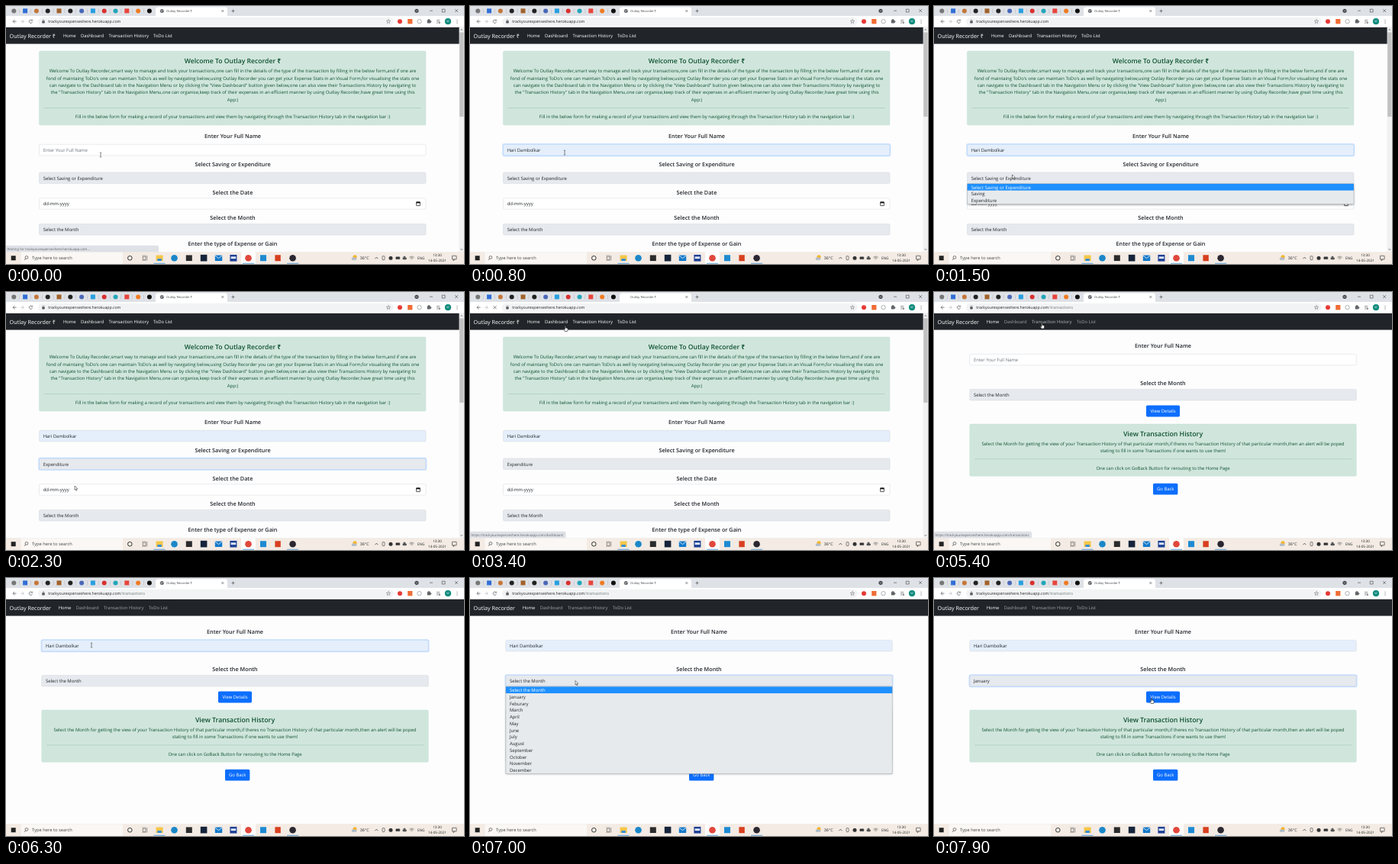
Write an HTML page with a canvas that moves like this. It is 600 px wide and 338 px high and loops after 8000 ms.

```html
<!DOCTYPE html>
<html lang="en">
<head>
<meta charset="utf-8">
<title>Outlay Recorder</title>
<style>
html, body { margin: 0; width: 100%; height: 100%; overflow: hidden; background: #fff; }
canvas { display: block; width: 600px; height: 338px; }
</style>
</head>
<body>
<canvas id="stage"></canvas>
<script>
const W = 600, H = 338, LOOP = 8000;
const canvas = document.getElementById('stage');
const ctx = canvas.getContext('2d');
const dpr = window.devicePixelRatio || 1;
canvas.width = W * dpr;
canvas.height = H * dpr;

const APP = 'Outlay Recorder', PERSON = 'Hari Dambolkar';
const HOST = 'trackyourexpenseshere.herokuapp.com';
const INK = '#212529', GREEN = '#0f5132', BLUE = '#0d6efd', DIM = '#a0a3a6', PAPER = '#fdfdfe';
const MONTHS = ['Select the Month', 'January', 'Feburary', 'March', 'April', 'May', 'June', 'July',
  'August', 'September', 'October', 'November', 'December'];
const KINDS = ['Select Saving or Expenditure', 'Saving', 'Expenditure'];

// Moments of the story, in ms
const T = {
  ready: 400, focusName: 300, fillName: 800, openKind: 1500, pickKind: 2300, blurKind: 2600,
  hoverDash: 3100, clickDash: 3300, dash: 3800, hoverTrans: 4400, clickTrans: 4900, trans: 5100,
  leaveNav: 5600, focusName2: 6000, fillName2: 6300, openMonth: 6800, pickMonth: 7500
};

// time, x, y of the pointer's hot spot
const PATH = [
  [0, 124, 195], [900, 124, 192], [1400, 102.5, 221], [1800, 102.5, 221], [2150, 90, 254],
  [2400, 90, 254], [3200, 125, 44.5], [3900, 125, 44.5], [4400, 141.5, 41], [5500, 141.5, 41],
  [5950, 112, 88], [6300, 112, 88], [6700, 138, 134.5], [7150, 138, 134.5], [7400, 84, 155],
  [7550, 84, 155], [7800, 285, 157.5], [8000, 285, 157.5]
];

function pointerAt(t) {
  let i = 0;
  while (i < PATH.length - 2 && t >= PATH[i + 1][0]) i++;
  const [t0, x0, y0] = PATH[i], [t1, x1, y1] = PATH[i + 1];
  const p = Math.min(1, (t - t0) / (t1 - t0)), e = p * p * (3 - 2 * p);
  return { x: x0 + (x1 - x0) * e, y: y0 + (y1 - y0) * e };
}

function rect(x, y, w, h, fill) {
  ctx.fillStyle = fill;
  ctx.fillRect(x, y, w, h);
}

function box(x, y, w, h, r, fill, stroke, lw = 0.4) {
  ctx.beginPath();
  ctx.roundRect(x, y, w, h, r);
  if (fill) { ctx.fillStyle = fill; ctx.fill(); }
  if (stroke) { ctx.strokeStyle = stroke; ctx.lineWidth = lw; ctx.stroke(); }
}

function disc(x, y, r, fill, stroke, lw = 0.7) {
  ctx.beginPath();
  ctx.arc(x, y, r, 0, Math.PI * 2);
  if (fill) { ctx.fillStyle = fill; ctx.fill(); }
  if (stroke) { ctx.strokeStyle = stroke; ctx.lineWidth = lw; ctx.stroke(); }
}

function line(points, color, lw = 0.6, close = false, fill) {
  ctx.beginPath();
  for (let i = 0; i < points.length; i += 2) ctx.lineTo(points[i], points[i + 1]);
  if (close) ctx.closePath();
  if (fill) { ctx.fillStyle = fill; ctx.fill(); }
  ctx.strokeStyle = color;
  ctx.lineWidth = lw;
  ctx.stroke();
}

// y is the middle of the capitals; set large and scaled down for exact spacing.
// The invisible skew keeps small glyphs from snapping to whole pixels.
function text(str, x, y, { size = 5.91, color = INK, weight = 400, align = 'left' } = {}) {
  const k = size / 100;
  ctx.save();
  ctx.transform(k, k * 2e-4, k * 2e-4, k, x, y + size * 0.36);
  ctx.font = weight + ' 100px "Open Sans", "Noto Sans", sans-serif';
  ctx.textRendering = 'geometricPrecision';
  ctx.textAlign = align;
  ctx.fillStyle = color;
  ctx.fillText(str, 0, 0);
  ctx.restore();
}

const heading = (str, x, y, size = 7.25, color = INK) =>
  text(str, x, y, { size, color, weight: 600, align: 'center' });

function paragraph(lines, x, y, step = 9.37) {
  lines.forEach((s, i) => text(s, x, y + i * step, { color: GREEN, align: 'center' }));
}

function field(x, y, str, { fill = '#fff', ring = false, color = INK } = {}) {
  if (ring) box(x - 0.6, y - 0.6, 507.7, 15.8, 2.2, null, 'rgba(13,110,253,.2)', 1.3);
  box(x, y, 506.5, 14.6, 1.6, fill, ring ? '#9cc4f6' : '#ced4da', 0.45);
  text(str, x + 5.2, y + 7.5, { color });
}

const input = (x, y, hint) => field(x, y, hint, { color: '#6c757d' });
const select = (x, y, str, ring) => field(x, y, str, { fill: '#e6e9ed', ring });

function nameField(x, y, hint, filled, ring) {
  if (filled) field(x, y, PERSON, { fill: '#e5effb', ring });
  else field(x, y, hint, { color: '#6c757d', ring });
}

function button(cx, y, w, str) {
  box(cx - w / 2, y, w, 14.8, 1.6, BLUE);
  text(str, cx, y + 7.5, { color: '#fff', align: 'center' });
}

function panel(x, y, h, rule) {
  box(x, y, 506.5, h, 1.6, '#d0e6dc', '#badbcc');
  rect(x + 6.5, rule, 493.5, 0.45, '#93b8a5');
}

function dropdown(x, y, items, step, mouse) {
  const h = items.length * step + 0.7;
  ctx.save();
  ctx.shadowColor = 'rgba(0,0,0,.4)';
  ctx.shadowBlur = 3 * dpr;
  ctx.shadowOffsetY = dpr;
  rect(x, y, 506.5, h, '#e7eaed');
  ctx.restore();
  const over = Math.floor((mouse.y - y - 0.3) / step);
  const active = over >= 0 && over < items.length ? over : 0;
  rect(x, y + 0.3 + active * step, 506.5, step, '#1e90ff');
  items.forEach((s, i) => text(s, x + 5.2, y + 0.5 + (i + 0.5) * step,
    { color: i === active ? '#fff' : INK }));
  box(x, y, 506.5, h, 0, null, '#8f979e', 0.4);
}

function scrollbar(end) {
  rect(593.6, 27.7, 6.4, 294.5, '#f1f1f1');
  rect(594.2, 34.5, 5.3, end - 34.5, '#c1c1c1');
  line([595.4, 32, 596.8, 30.4, 598.2, 32], '#606060', 0.7);
  line([595.4, 318, 596.8, 319.6, 598.2, 318], '#606060', 0.7);
}

function nav(brand, links, color) {
  rect(0, 27.7, 600, 21.9, INK);
  text(brand, 4.6, 39.4, { size: 7.2, color: '#fff' });
  links.forEach(([s, x], i) => text(s, x, 39.2, { size: 5.82, color: color(i) }));
}

const HOME_LINKS = [['Home', 75], ['Dashboard', 98], ['Transaction History', 134.5], ['ToDo List', 193]];
const SUB_LINKS = [['Home', 68.8], ['Dashboard', 91.7], ['Transaction History', 128], ['ToDo List', 187]];

function homePage(t, mouse) {
  const x = 43.5, cx = 297;
  nav(APP + ' ₹', HOME_LINKS, () => '#fff');
  panel(x, 59, 97.1, 133.3);
  heading(`Welcome To ${APP} ₹`, cx, 72, 8.6, GREEN);
  paragraph([
    `Welcome To ${APP},smart way to manage and track your transactions,one can fill in the details of the type of the transaction by filling in the below form,and if one are`,
    `fond of maintaing ToDo's one can maintain ToDo's as well by navigating below,using ${APP} you can get your Expense Stats in an Visual Form,for visualising the stats one`,
    'can navigate to the Dashboard tab in the Navigation Menu or by clicking the "View Dashboard" button given below,one can also view their Transactions History by navigating to',
    `the "Transaction History" tab in the Navigation Menu,one can organise,keep track of their expenses in an efficient manner by using ${APP},have great time using this`,
    'App:)'
  ], cx, 85.2);
  paragraph(['Fill in the below form for making a record of your transactions and view them by navigating through the Transaction History tab in the navigation bar :)'], cx, 145.3);

  heading('Enter Your Full Name', cx, 170.7);
  nameField(x, 181.3, 'Enter Your Full Name', t >= T.fillName, t >= T.focusName && t < T.openKind + 100);
  heading('Select Saving or Expenditure', cx, 207.5);
  select(x, 218, KINDS[t >= T.pickKind ? 2 : 0], t >= T.openKind + 100 && t < T.blurKind);
  heading('Select the Date', cx, 244.2);
  field(x, 251.6, 'dd-mm-yyyy');
  box(537.6, 256.8, 4.8, 4.8, 0.4, null, '#111', 0.7);
  rect(537.5, 256.6, 5, 1.7, '#111');
  heading('Select the Month', cx, 277.8);
  select(x, 285.4, MONTHS[0]);
  heading('Enter the type of Expense or Gain', cx, 311.5);
  if (t >= T.openKind && t < T.pickKind) dropdown(x, 232.6, KINDS, 8.75, mouse);
  scrollbar(145);
}

function dashboardPage(t) {
  const x = 43.5, cx = 297;
  nav(APP, SUB_LINKS, i => i === 0 ? '#fff' : i === 2 && t >= T.hoverTrans ? '#c8c9ca' : DIM);
  heading('Expense Dashboard', cx, 66.4, 10);
  panel(x, 81.7, 109.8, 125.8);
  paragraph([
    'Money considered is based on Montly Income,all the computations are done based on Montly Income only,if there are any other sources of income,kindly try include them under',
    `Savings and if you have used that money on some Expenditures,kindly include them into Expenditures,for getting the better experience of the ${APP},user can view all`,
    'their transactions by clicking on the "View Transactions" button given at the end.'
  ], cx, 96.5);
  paragraph([
    'Enter The Annual Income and the Month so that one can track their expenditures and savings monthwise as well as on Day by Day Basis,also',
    'One can view their transactions,by clicking the "View Transaction" button'
  ], cx, 138);
  button(299.8, 160.9, 59.4, 'View Transactions');
  heading('Enter Full Name', cx, 206.4);
  input(x, 216.9, 'Enter Your Full Name');
  heading('Enter Annual Income', cx, 243.2);
  input(x, 253.6, 'Enter the Annual Income');
  heading('Select The Month', cx, 279.8);
  select(x, 290.4, 'Select The Month');
  button(299.8, 314.8, 55.5, 'View Dashboard');
  scrollbar(287);
}

function transactionsPage(t, mouse) {
  const x = 46.8, cx = 300;
  nav(APP, SUB_LINKS, i => i === 0 ? '#fff' : i === 2 && t < T.leaveNav ? '#b8babc' : DIM);
  heading('Enter Your Full Name', cx, 70.5);
  nameField(x, 81.4, 'Enter Your Full Name', t >= T.fillName2, t >= T.focusName2 && t < T.openMonth);
  heading('Select the Month', cx, 119.8);
  select(x, 127.4, MONTHS[t >= T.pickMonth ? 1 : 0], t >= T.openMonth);
  button(300, 148.6, 44, 'View Details');
  panel(x, 173, 68.2, 218.7);
  heading('View Transaction History', cx, 185.7, 8.75, GREEN);
  paragraph([
    'Select the Month for getting the view of your Transaction History of that particular month,if theres no Transaction History of that particular month,then an alert will be poped',
    'stating to fill in some Transactions if one wants to use them!'
  ], cx, 198.9);
  paragraph(['One can click on GoBack Button for rerouting to the Home Page'], cx, 230.4);
  button(303.2, 250.8, 32.4, 'Go Back');
  if (t >= T.openMonth && t < T.pickMonth) dropdown(x, 142, MONTHS, 8.75, mouse);
}

const TABS = ['#777', '#2f6fd6', '#c4763a', '#222', '#a0622a', '#222', '#4a68b8', '#28a0e0', '#d93030',
  '#22a6b8', '#e8453c', '#ef7b22', '#111'];

function browserTop(path, loading) {
  rect(0, 0, 600, 13, '#dee1e6');
  TABS.forEach((c, i) => {
    const x = 10.3 + i * 14.8;
    if (i % 3 === 1) rect(x - 3, 3.4, 6, 6, c);
    else disc(x, 6.4, 3, c);
    if (i) rect(x - 7.6, 3.5, 0.4, 6, '#a9adb3');
  });
  box(196, 1.4, 94, 13, [3, 3, 0, 0], '#fff');
  if (!loading) {
    disc(204.3, 6.5, 2.5, '#5f6368');
    line([202.6, 5.6, 204, 6.6, 203.6, 8], '#fff', 0.6);
    line([205, 4.8, 205.8, 6.4], '#fff', 0.6);
  }
  text(APP + ' ₹', 210, 6.5, { size: 4.05, color: '#3c4043' });
  line([282.4, 5.1, 285.2, 7.9], '#444');
  line([285.2, 5.1, 282.4, 7.9], '#444');
  line([295.4, 6.5, 299.6, 6.5], '#444');
  line([297.5, 4.4, 297.5, 8.6], '#444');
  disc(538, 6.3, 2.6, '#4a4d51');
  line([537, 5.8, 538, 6.9, 539, 5.8], '#fff', 0.5);
  line([555, 6.2, 559, 6.2], '#222', 0.5);
  box(571.3, 4.2, 3.8, 3.8, 0, null, '#222', 0.5);
  line([588.2, 4.2, 592, 8], '#222', 0.5);
  line([592, 4.2, 588.2, 8], '#222', 0.5);

  rect(0, 13, 600, 14.7, '#fff');
  box(42, 14.8, 465.5, 11, 5.5, '#f1f3f4');
  line([11.4, 17.9, 9.1, 20.2, 11.4, 22.5], '#50545a', 0.7);
  line([9.2, 20.2, 13.6, 20.2], '#50545a', 0.7);
  line([21.2, 17.9, 23.5, 20.2, 21.2, 22.5], '#b5b8bc', 0.7);
  line([19, 20.2, 23.4, 20.2], '#b5b8bc', 0.7);
  if (loading) {
    line([30.6, 18.2, 34.6, 22.2], '#50545a', 0.7);
    line([34.6, 18.2, 30.6, 22.2], '#50545a', 0.7);
  } else {
    ctx.beginPath();
    ctx.arc(32.5, 20.2, 2.2, 0.4, 5.4);
    ctx.strokeStyle = '#50545a';
    ctx.lineWidth = 0.7;
    ctx.stroke();
    line([34.7, 17.6, 34.7, 19.4, 32.9, 19.4], '#50545a', 0.6);
  }
  box(47.3, 19.6, 3.4, 2.9, 0.4, '#50545a');
  box(48, 17.9, 2, 3, 1, null, '#50545a', 0.5);
  text(HOST, 55.2, 20.2, { size: 5.13, color: '#202124' });
  text(path, 150.6, 20.2, { size: 5.13, color: '#70757a' });

  const star = [];
  for (let i = 0; i < 10; i++) {
    const r = i % 2 ? 1.2 : 2.8, a = i * Math.PI / 5 - Math.PI / 2;
    star.push(501 + r * Math.cos(a), 20.3 + r * Math.sin(a));
  }
  line(star, '#5f6368', 0.5, true);
  disc(516, 20.2, 3, '#e53935');
  rect(526.2, 17, 6.2, 6.4, '#ef6c35');
  disc(541.5, 20.2, 2.7, null, '#8a8d91');
  box(551.8, 18.2, 4.4, 4.4, 0.6, '#5f6368');
  disc(554, 17.9, 1, '#5f6368');
  disc(556.5, 20.4, 1, '#5f6368');
  for (let i = 0; i < 3; i++) {
    rect(564, 18 + i * 1.9, i === 2 ? 2.6 : 4.4, 0.6, '#5f6368');
    disc(591, 18.2 + i * 2, 0.55, '#5f6368');
  }
  disc(568, 22, 0.9, '#5f6368');
  disc(579, 20.2, 4.1, '#128c7e');
  text('st', 579, 20, { size: 4, color: '#fff', align: 'center' });
}

function statusBar(str, w) {
  box(-1, 314.2, w + 1, 9, [0, 1.5, 0, 0], '#dee1e6', '#c4c7cc', 0.4);
  text(str, 1.6, 318.3, { size: 4.39, color: '#5f6368' });
}

function taskbar() {
  rect(0, 322.2, 600, 15.8, '#f3ebe4');
  rect(19.5, 322.5, 133.5, 15.5, '#faf7f4');
  rect(6.7, 327.2, 6, 6, '#222');
  disc(27, 329.4, 1.9, null, '#333', 0.6);
  line([25.7, 330.8, 24, 332.8], '#333', 0.7);
  text('Type here to search', 34, 330.2, { size: 5.76, color: '#444' });
  disc(162.3, 330.2, 2.8, null, '#222', 0.9);
  box(179.3, 328, 3.6, 4.4, 0, null, '#444', 0.6);
  line([178, 327, 184, 327], '#777', 0.4);
  line([178, 333.4, 184, 333.4], '#777', 0.4);
  line([184.7, 327, 184.7, 333.4], '#444', 0.5);

  rect(308, 322.2, 19, 15.8, '#fffdfb');
  box(196.6, 326.6, 9, 7.4, 0.6, '#f5c64a');
  rect(198.4, 331, 5.4, 3, '#3b8fd4');
  disc(220.5, 330.2, 4.3, '#1b87c9');
  rect(235.8, 326.4, 8, 7.6, '#2b2b2b');
  rect(254.8, 325.8, 8.6, 8.6, '#15243a');
  box(273.8, 326.4, 9.4, 7.6, 0.4, '#1479c9');
  line([274, 327, 278.5, 330.6, 283, 327], '#fff', 0.8);
  rect(293.4, 325.9, 9, 8.6, '#1c3f94');
  rect(294.6, 328.3, 6.6, 2.8, '#dfe8f7');
  disc(317.5, 330.2, 4.3, '#e0483c');
  rect(333, 326.2, 8, 8, '#1f8ad2');
  rect(352.4, 326.2, 7.4, 8, '#d8401f');
  disc(375.6, 330.2, 4.3, '#2a2730');
  for (const x of [201, 317.5, 375.6]) rect(x - 7.5, 336.8, 15, 0.8, '#3f8fd0');

  disc(457, 328.8, 2.6, '#f5b52e');
  box(452.8, 329.6, 6.4, 3.2, 1.6, '#aebccb');
  text('36°C', 463.8, 330.2, { size: 5.3, color: '#222' });
  line([483.4, 331.2, 485.4, 329.2, 487.4, 331.2], '#222', 0.7);
  box(493, 327.6, 3, 5, 0.8, null, '#333', 0.6);
  disc(504, 330.2, 2.5, '#333');
  box(510.8, 328.8, 5, 2.8, 0.3, '#333', '#333', 0.5);
  box(519.4, 329.4, 5.6, 2.8, 1.4, '#555');
  disc(522, 329, 1.5, '#555');
  for (let i = 1; i < 4; i++) {
    ctx.beginPath();
    ctx.arc(531.5, 332.6, i * 1.5, -2.3, -0.85);
    ctx.strokeStyle = '#555';
    ctx.lineWidth = 0.6;
    ctx.stroke();
  }
  text('ENG', 538.9, 330.2, { size: 4.7, color: '#222' });
  text('13:30', 565, 326.6, { size: 4.6, color: '#222', align: 'center' });
  text('14-05-2021', 565, 333.8, { size: 4.6, color: '#222', align: 'center' });
  box(584.5, 327.3, 5.6, 4.6, 0.3, null, '#222', 0.6);
  line([586, 331.9, 586, 333.6, 587.8, 331.9], '#222', 0.6);
}

function pointer({ x, y }, kind) {
  ctx.save();
  ctx.translate(x, y);
  if (kind === 'beam') {
    line([0, -2.8, 0, 2.8], '#333', 0.6);
    line([-1.2, -2.9, 1.2, -2.9], '#333', 0.5);
    line([-1.2, 2.9, 1.2, 2.9], '#333', 0.5);
  } else if (kind === 'hand') {
    line([-0.6, 0, 0.4, 0, 0.5, 2.4, 3, 3, 3.2, 5, 2.4, 7, -0.6, 7, -2.2, 4.4, -1.6, 3.8, -0.6, 4.6],
      '#111', 0.6, true, '#fff');
  } else {
    line([0, 0, 0, 5.4, 1.2, 4.3, 2.1, 6.2, 3, 5.8, 2.1, 3.9, 3.8, 3.8], '#111', 0.5, true, '#fff');
  }
  ctx.restore();
}

function pointerKind(t, { x, y }) {
  if (y < 48) return 'hand';
  if (t < T.dash) return y > 182 && y < 196 && t < T.openKind ? 'beam' : 'arrow';
  if (t >= T.trans && y > 81 && y < 96) return 'beam';
  return t > T.pickMonth && y > 148 && x > 278 ? 'hand' : 'arrow';
}

function draw(t) {
  const mouse = pointerAt(t);
  const leaving = (t >= T.clickDash && t < T.dash) || (t >= T.clickTrans && t < T.trans);
  ctx.setTransform(dpr, 0, 0, dpr, 0, 0);
  rect(0, 0, W, H, PAPER);
  let path = '';
  if (t < T.dash) {
    homePage(t, mouse);
  } else if (t < T.trans) {
    path = '/dashboard';
    dashboardPage(t);
  } else {
    path = '/transactions';
    transactionsPage(t, mouse);
  }
  browserTop(path, leaving);
  if (t < T.ready) statusBar(`Waiting for ${HOST}...`, 199.5);
  else if (t >= T.hoverDash && t < T.dash + 200) statusBar(`https://${HOST}/dashboard`, 125);
  else if (t >= T.hoverTrans && t < T.leaveNav) statusBar(`https://${HOST}/transactions`, 127.5);
  taskbar();
  pointer(mouse, pointerKind(t, mouse));
}

const start = performance.now();
function tick() {
  draw((performance.now() - start) % LOOP);
  requestAnimationFrame(tick);
}
tick();
</script>
</body>
</html>
```
